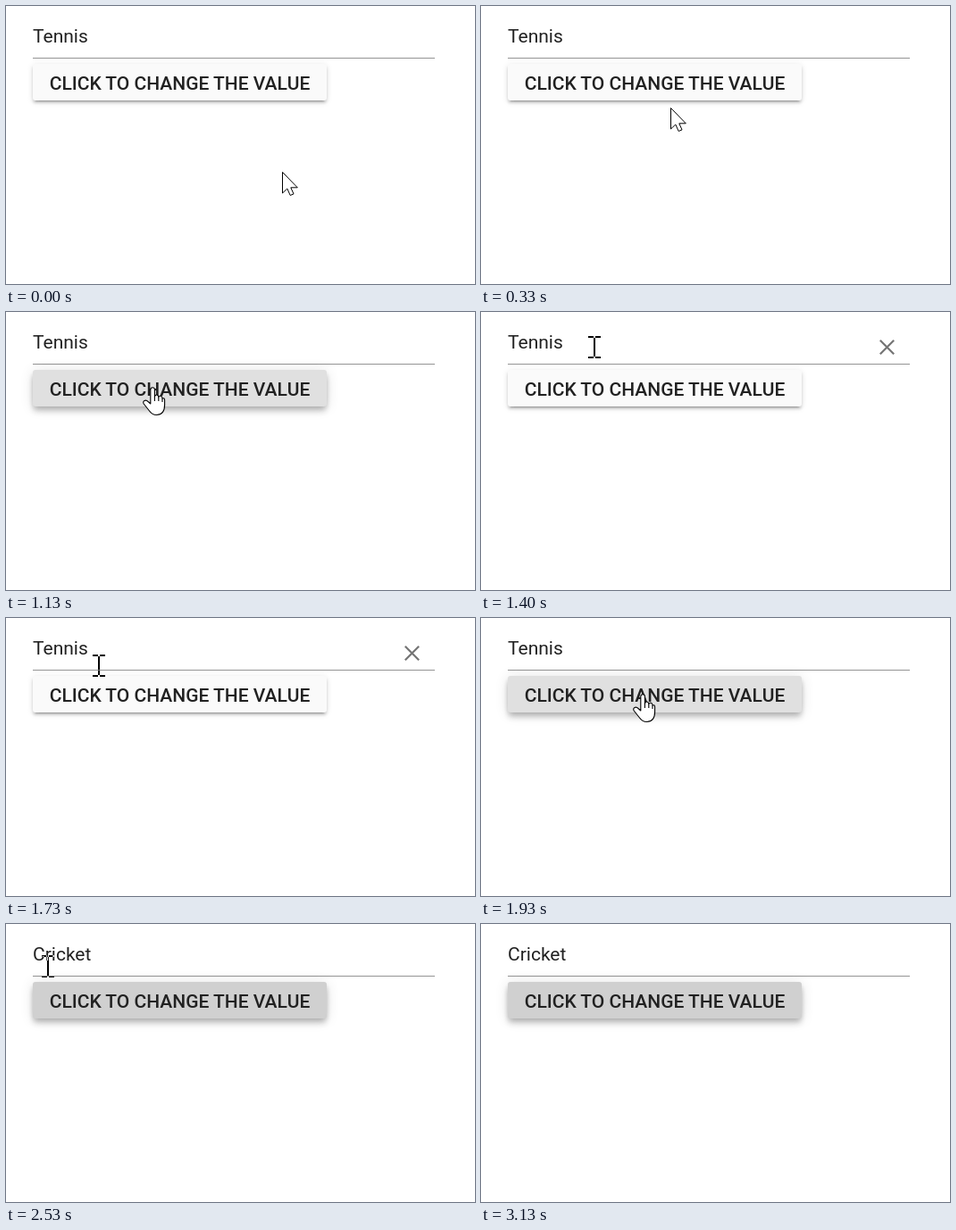
Animation, 525 px wide and 312 px high, one loop 3590 ms. Source, as an HTML page:

```html
<!DOCTYPE html>
<html lang="en">
<head>
<meta charset="utf-8">
<title>Change the value</title>
<style>
html, body { margin: 0; width: 100%; height: 100%; overflow: hidden; background: #fff; }
.stage { position: absolute; inset: 0; background: #fff; font: 21px/24px Roboto, sans-serif; color: #212121; }
.stage > * { position: absolute; }
.stage span { white-space: nowrap; }
.value { left: 30px; top: 22px; }
.line { left: 30px; top: 58px; width: 450px; height: 1px; background: #949494; }
.clear { left: 445px; top: 30px; stroke: #757575; stroke-width: 2.2; }
.button {
  left: 30px; top: 65px; width: 329px; height: 41px; border-radius: 3px;
  font-weight: 500; text-align: center; background: #fafafa;
}
.button span { position: absolute; left: 0; right: 0; top: 10px; }
.cursor { left: 0; top: 0; overflow: visible; fill: #fff; stroke: #000; stroke-linejoin: round; }
.beam { stroke: none; mix-blend-mode: difference; }

.anim { animation: 3.59s step-end infinite; }
.old { animation-name: old; }
.new { animation-name: new; }
.clear { animation-name: clear; }
.button { animation-name: button; }
.cursor { animation: move 3.59s step-end infinite, var(--show) 3.59s step-end infinite; }
.arrow { --show: arrow; }
.hand { --show: hand; }
.beam { --show: beam; }

@keyframes old { 0% { opacity: 1 } 59.33%, 100% { opacity: 0 } }
@keyframes new { 0% { opacity: 0 } 59.33%, 100% { opacity: 1 } }
@keyframes clear {
  0%, 50.13%, 79.94%, 100% { opacity: 0 }
  37.04%, 72.42% { opacity: 1 }
}
@keyframes button {
  0%, 35.37% {
    background: #fafafa;
    box-shadow: 0 4.5px 1.5px -3px #0003, 0 3px 3px #00000024, 0 1.5px 7.5px #0000001f;
  }
  11.14%, 50.13% {
    background: #e0e0e0;
    box-shadow: 0 3px 6px -1.5px #0003, 0 6px 7.5px #00000024, 0 1.5px 15px #0000001f;
  }
  57.66%, 100% {
    background: #d0d0d0;
    box-shadow: 0 3px 6px -1.5px #0003, 0 6px 7.5px #00000024, 0 1.5px 15px #0000001f;
  }
}
@keyframes arrow {
  0%, 64.9%, 81.61% { opacity: 1 }
  11.14%, 70.47%, 87.18%, 100% { opacity: 0 }
}
@keyframes hand {
  0%, 35.37%, 64.9%, 81.61%, 100% { opacity: 0 }
  11.14%, 50.13%, 79.94% { opacity: 1 }
}
@keyframes beam {
  0%, 50.13%, 79.94%, 100% { opacity: 0 }
  35.37%, 70.47% { opacity: 1 }
}
@keyframes move {
  /* down to the button */
  0% { transform: translate(309px, 186px) }
  1.94% { transform: translate(305px, 182px) }
  3.62% { transform: translate(291px, 169px) }
  5.57% { transform: translate(268px, 150px) }
  7.52% { transform: translate(240px, 130px) }
  9.19% { transform: translate(212px, 114px) }
  11.14% { transform: translate(188px, 101px) }
  13.09% { transform: translate(173px, 95px) }
  14.76% { transform: translate(165px, 92px) }
  16.71% { transform: translate(165px, 90px) }
  /* over the field */
  31.47% { transform: translate(164px, 84px) }
  33.42% { transform: translate(160px, 72px) }
  35.37% { transform: translate(152px, 53px) }
  37.04% { transform: translate(140px, 43px) }
  38.99% { transform: translate(127px, 39px) }
  40.94% { transform: translate(68px, 40px) }
  42.61% { transform: translate(33px, 42px) }
  44.56% { transform: translate(40px, 44px) }
  /* back to press */
  46.51% { transform: translate(66px, 47px) }
  48.18% { transform: translate(104px, 53px) }
  50.13% { transform: translate(142px, 70px) }
  52.08% { transform: translate(170px, 81px) }
  53.76% { transform: translate(181px, 85px) }
  /* around the left edge into the field */
  63.23% { transform: translate(160px, 96px) }
  64.9% { transform: translate(106px, 106px) }
  66.85% { transform: translate(22px, 103px) }
  68.8% { transform: translate(6px, 73px) }
  70.47% { transform: translate(47px, 47px) }
  72.42% { transform: translate(72px, 37px) }
  74.37% { transform: translate(52px, 38px) }
  76.04% { transform: translate(33px, 42px) }
  /* away */
  77.99% { transform: translate(58px, 48px) }
  79.94% { transform: translate(120px, 88px) }
  81.61% { transform: translate(190px, 140px) }
  83.56% { transform: translate(240px, 200px) }
  85.51%, 100% { transform: translate(270px, 267px) }
}
</style>
</head>
<body>
<div class="stage">
  <span class="value anim old">Tennis</span>
  <span class="value anim new">Cricket</span>
  <div class="line"></div>
  <svg class="anim clear" width="19" height="19"><path d="M1.8 1.8 17.2 17.2M17.2 1.8 1.8 17.2"/></svg>
  <div class="anim button"><span>CLICK TO CHANGE THE VALUE</span></div>
  <svg class="cursor arrow" width="19" height="28">
    <path d="M.5 .5V24L5.8 19 9.2 26.5 13 24.9 9.8 17.8H17.3Z"/>
  </svg>
  <svg class="cursor hand" width="26" height="33">
    <g transform="translate(-11)" stroke-width="1.1">
      <path d="M8.8 17V3.3Q8.8.8 11.1.8T13.4 3.3V11Q14 8.7 15.8 9T17.8 11.8Q18.4 9.8 20.2 10.3T22 13Q24.6 12 24.6 15V20Q24.6 31.5 15.5 31.5 10.5 31.5 7.5 27L1.2 19Q0 16.5 2 15.5T6 16.5L8.8 19Z"/>
      <path d="M13.4 11V16M17.8 11.8V16M22 13V17"/>
    </g>
  </svg>
  <svg class="cursor beam" width="14" height="25">
    <path d="M-7-12H-1V-10H1V-12H7V-10H1V11H7V13H1V11H-1V13H-7V11H-1V-10H-7Z"/>
  </svg>
</div>
</body>
</html>
```
